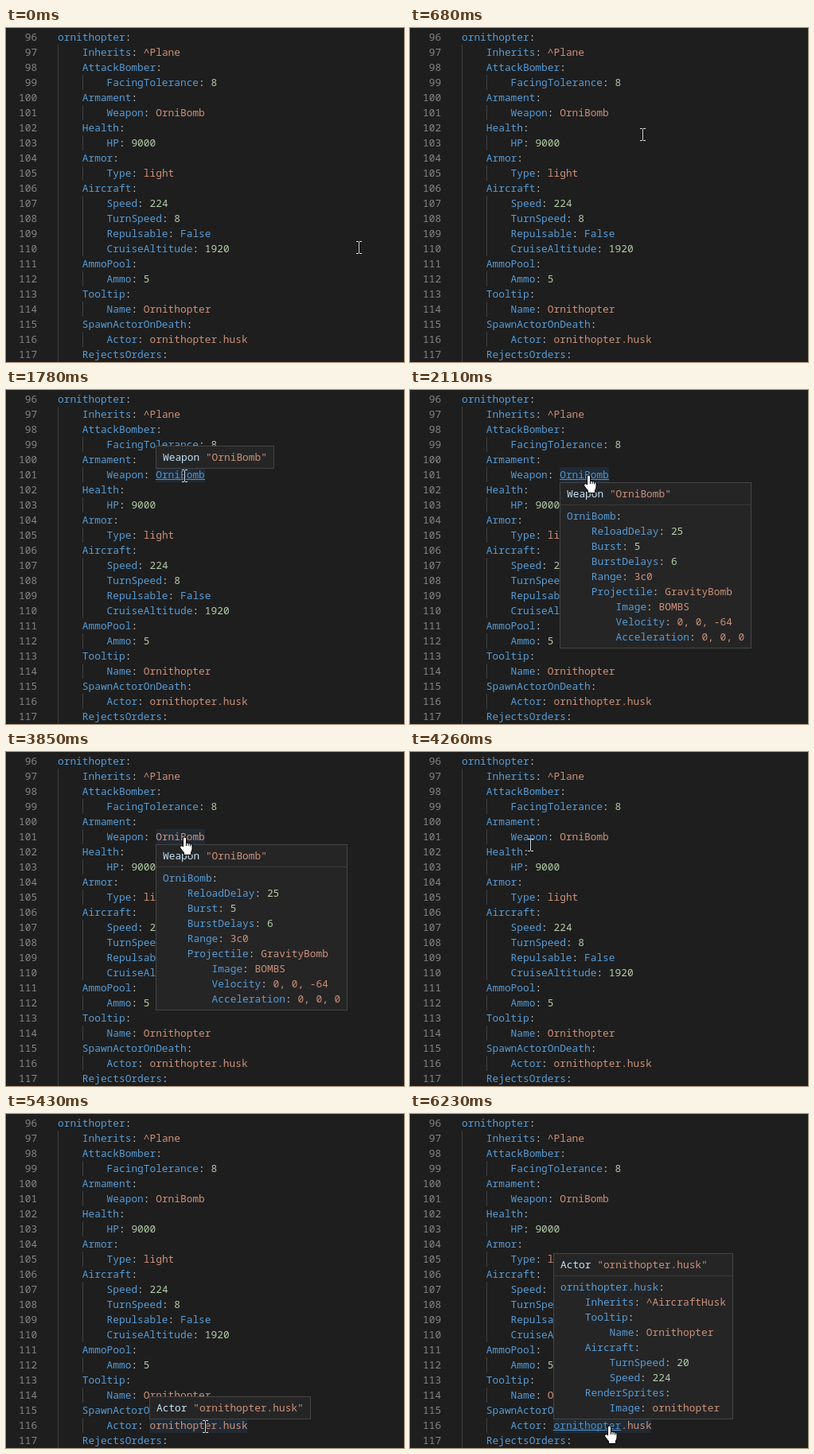
These frames come from a looping animation (500 by 420 pixels, 7220 ms). An HTML page with a canvas:

```html
<!DOCTYPE html>
<html>
<head>
<meta charset="utf-8">
<title>Hover definitions</title>
<style>
html, body { margin: 0; height: 100%; overflow: hidden; background: #1e1e1e; }
canvas { display: block; }
</style>
</head>
<body>
<canvas id="stage" width="500" height="420"></canvas>
<script>
const ctx = document.getElementById('stage').getContext('2d');
const LOOP = 7220, CH = 7.7, ROW = 19, LEFT = 65, TOP = 2, TICK = 68.6;
const C = {
  bg: '#1e1e1e', mark: '#202a34', guide: '#404040', lineNo: '#858585',
  key: '#569cd6', punct: '#d4d4d4', str: '#ce9178', num: '#b5cea8',
  link: '#4e94ce', kind: '#c5e2f5', tip: '#252526', border: '#454545', rule: '#3a3a3b'
};

const code = `ornithopter:
    Inherits: ^Plane
    AttackBomber:
        FacingTolerance: 8
    Armament:
        Weapon: OrniBomb
    Health:
        HP: 9000
    Armor:
        Type: light
    Aircraft:
        Speed: 224
        TurnSpeed: 8
        Repulsable: False
        CruiseAltitude: 1920
    AmmoPool:
        Ammo: 5
    Tooltip:
        Name: Ornithopter
    SpawnActorOnDeath:
        Actor: ornithopter.husk
    RejectsOrders:`.split('\n');

const weapon = { kind: 'Weapon', name: 'OrniBomb', row: 5, col: 16, link: 8, body: `OrniBomb:
    ReloadDelay: 25
    Burst: 5
    BurstDelays: 6
    Range: 3c0
    Projectile: GravityBomb
        Image: BOMBS
        Velocity: 0, 0, -64
        Acceleration: 0, 0, 0`.split('\n') };

const actor = { kind: 'Actor', name: 'ornithopter.husk', row: 20, col: 15, link: 11, body: `ornithopter.husk:
    Inherits: ^AircraftHusk
    Tooltip:
        Name: Ornithopter
    Aircraft:
        TurnSpeed: 20
        Speed: 224
    RenderSprites:
        Image: ornithopter`.split('\n') };

// Mouse paths: [tick, x, y]
const toWeapon = [[-1, 443, 276], [3, 400, 235], [7, 312, 151], [10, 260, 112], [14, 224, 108]];
const toActor = [[0, 224, 108], [1, 214, 108], [3, 151, 117], [5, 129, 165],
  [8, 150, 300], [10, 190, 366], [13, 244, 396], [16, 250, 393]];

const hand = new Path2D('M-2 11V1a2 2 0 0 1 4 0V6l5 1.2q2.500.6 2.500 3V14q0 2-1.500 4v3.500H-1v-3L-5.500 13q-1-2 .5-3t3 1Z');
const knuckles = new Path2D('M2 6v4M4.500 7v3M7 7.500v3');

function rect(x, y, w, h, color) {
  ctx.fillStyle = color;
  ctx.fillRect(x, y, w, h);
}

function text(s, x, y, color) {
  ctx.fillStyle = color;
  ctx.fillText(s, x, y);
}

function codeLine(line, x, y) {
  const [, pad, key, value] = line.match(/^( *)([^:]+): ?(.*)$/);
  const at = n => x + n * CH;
  const end = pad.length + key.length;
  text(key, at(pad.length), y, C.key);
  text(':', at(end), y, C.punct);
  text(value, at(end + 2), y, /^\d+$/.test(value) ? C.num : value === 'False' ? C.key : C.str);
}

function editor() {
  rect(0, 0, 500, 420, C.bg);
  code.forEach((line, i) => {
    const y = TOP + i * ROW, depth = line.search(/\S/) / 4;
    for (let d = 0; d < depth; d++) rect(Math.round(LEFT + d * 4 * CH), y, 1, ROW, C.guide);
    const n = String(96 + i);
    text(n, 39.2 - n.length * CH, y + 14, C.lineNo);
    codeLine(line, LEFT, y + 14);
  });
}

function markWord(def, linked) {
  const x = LEFT + def.col * CH, y = TOP + def.row * ROW, n = linked ? def.link : 0;
  rect(Math.floor(x), y, Math.round(def.name.length * CH), ROW, C.mark);
  text(def.name.slice(0, n), x, y + 14, C.link);
  rect(Math.floor(x), y + 15, Math.round(n * CH), 1, C.link);
  text(def.name.slice(n), x + n * CH, y + 14, C.str);
}

function tooltip(def, y, full, alpha = 1) {
  const quoted = `"${def.name}"`;
  const rows = full ? def.body : [];
  const chars = Math.max(def.kind.length + 1 + quoted.length, ...rows.map(r => r.length));
  const x = Math.floor(LEFT + def.col * CH);
  const w = Math.round(chars * CH + 18), h = full ? 209 : 29;
  ctx.globalAlpha = alpha;
  rect(x, y, w, h, C.border);
  rect(x + 1, y + 1, w - 2, h - 2, C.tip);
  text(def.kind, x + 9, y + 19, C.kind);
  text(quoted, x + 9 + (def.kind.length + 1) * CH, y + 19, C.str);
  if (full) rect(x + 1, y + 28, w - 2, 1, C.rule);
  rows.forEach((r, i) => codeLine(r, x + 9, y + 47 + i * ROW));
  ctx.globalAlpha = 1;
}

// Smooth curve through the path points
function along(path, k) {
  const last = path.length - 1;
  k = Math.max(path[0][0], Math.min(path[last][0], k));
  let i = 0;
  while (i < last - 1 && k > path[i + 1][0]) i++;
  const a = path[i], b = path[i + 1], span = b[0] - a[0], u = (k - a[0]) / span;
  const slope = (j, c) => j === 0 || j === last ? 0
    : (path[j + 1][c] - path[j - 1][c]) / (path[j + 1][0] - path[j - 1][0]);
  return [1, 2].map(c => Math.round(
    a[c] * (1 + 2 * u) * (1 - u) ** 2 + b[c] * u * u * (3 - 2 * u)
    + span * u * (1 - u) * (slope(i, c) * (1 - u) - slope(i + 1, c) * u)));
}

function pointer(t) {
  const [x, y] = t < 4050 ? along(toWeapon, Math.floor((t - 70) / TICK + 0.01))
    : along(toActor, Math.floor((t - 4050) / TICK));
  if ((t >= 1910 && t < 4050) || t >= 5890) {
    ctx.save();
    ctx.translate(x + 0.5, y);
    ctx.fillStyle = '#fff';
    ctx.strokeStyle = '#000';
    ctx.lineWidth = 1;
    ctx.fill(hand);
    ctx.stroke(hand);
    ctx.stroke(knuckles);
    ctx.restore();
    return;
  }
  rect(x - 1, y - 7, 3, 14, 'rgba(0,0,0,.6)');
  rect(x, y - 7, 1, 14, '#e1e1e1');
  for (const s of [y - 8, y + 7]) {
    rect(x - 3, s, 3, 1, '#e1e1e1');
    rect(x + 1, s, 3, 1, '#e1e1e1');
  }
}

function fade(t, start) {
  return t < start + 80 ? 0.13 : t < start + 130 ? 0.6 : 1;
}

function draw(t) {
  editor();
  if (t >= 1250 && t < 4187) {
    markWord(weapon, t >= 1780 && t < 3850);
    if (t >= 2110 && t < 4050) tooltip(weapon, 116, true);
    else tooltip(weapon, 70, false, fade(t, 1250));
  } else if (t >= 5300) {
    markWord(actor, t >= 5830);
    if (t >= 6170) tooltip(actor, 175, true);
    else tooltip(actor, 355, false, fade(t, 5300));
  }
  pointer(t);
}

const begin = performance.now();
function frame() {
  ctx.font = '12.833px "Noto Sans Mono", "DejaVu Sans Mono", monospace';
  draw((performance.now() - begin) % LOOP);
  requestAnimationFrame(frame);
}
frame();
</script>
</body>
</html>
```
